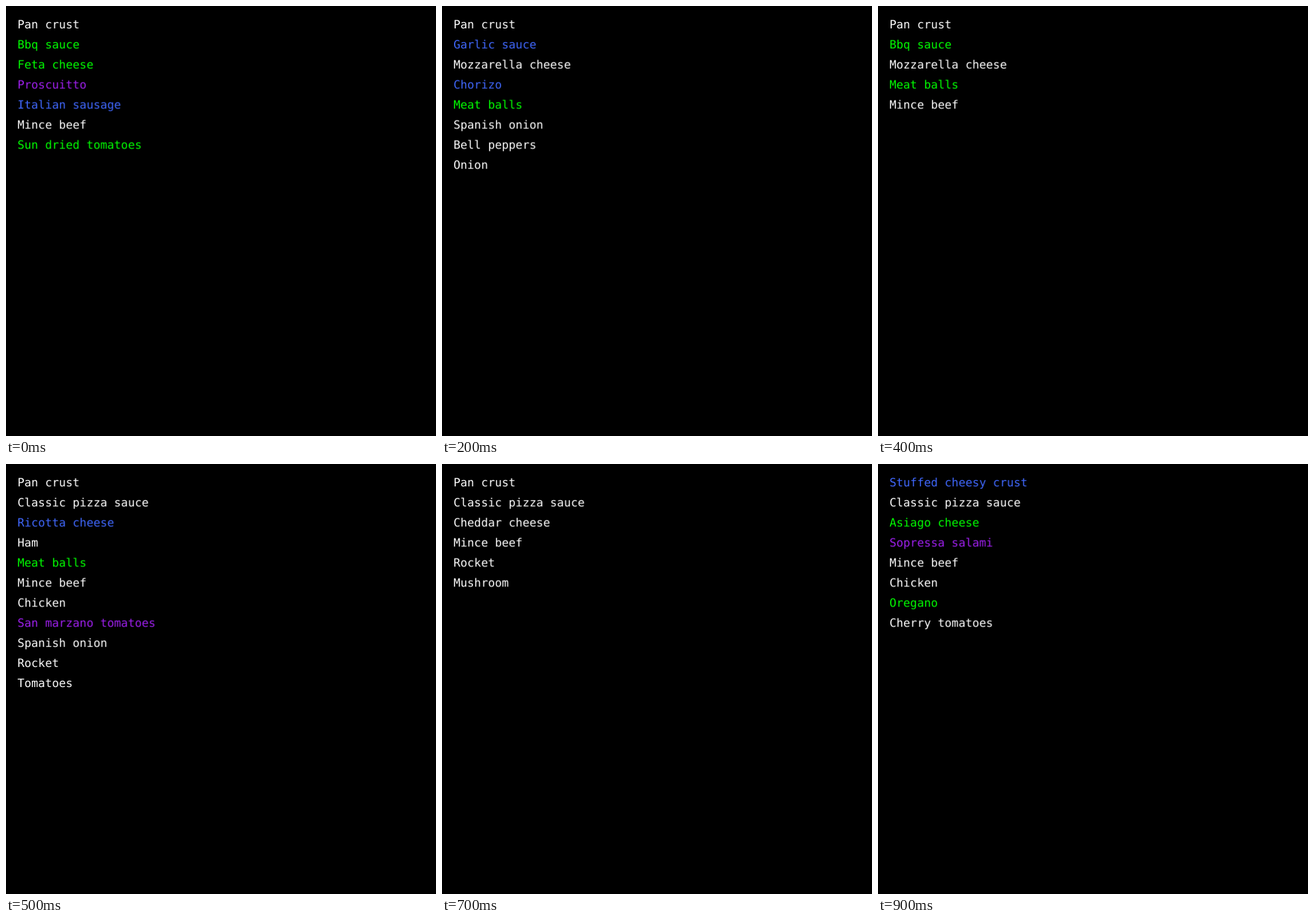
An HTML page with a canvas that plays this animation: 748x748 px, repeating every 1 s.

```html
<!DOCTYPE html>
<html lang="en">
<head>
<meta charset="utf-8">
<title>Random pizzas</title>
<style>
  html, body { margin: 0; height: 100%; overflow: hidden; background: #000; }
  canvas { display: block; width: 748px; height: 748px; }
</style>
</head>
<body>
<canvas id="stage" width="750" height="750"></canvas>
<script>
// The list is laid out on a 750 px square that CSS fits to the stage.
const SIZE = 750, STEP = 100;
const LEFT = 20, BASELINE = 39, LINE = 35;

// Items that are not listed here are common and white.
const rarity = {
  '#00ff00': 'Gluten free crust,Bbq sauce,Feta cheese,Asiago cheese,Meat balls,Sun dried tomatoes,Garlic,Oregano',
  '#4169ff': 'Stuffed cheesy crust,Garlic sauce,Ricotta cheese,Italian sausage,Chorizo,Basil',
  '#a020f0': 'Proscuitto,Sopressa salami,Anchovies,San marzano tomatoes'
};
const colors = {};
for (const [color, items] of Object.entries(rarity))
  for (const item of items.split(',')) colors[item] = color;

const pizzas = [
  'Pan crust,Bbq sauce,Feta cheese,Proscuitto,Italian sausage,Mince beef,Sun dried tomatoes',
  'Pan crust,Classic pizza sauce,Mozzarella cheese,Ham,Mince beef,Onion,Mushroom',
  'Pan crust,Garlic sauce,Mozzarella cheese,Chorizo,Meat balls,Spanish onion,Bell peppers,Onion',
  'Gluten free crust,Classic pizza sauce,Cheddar cheese,Italian sausage,Mince beef,Anchovies,Onion,Garlic,Basil,Spinach',
  'Pan crust,Bbq sauce,Mozzarella cheese,Meat balls,Mince beef',
  'Pan crust,Classic pizza sauce,Ricotta cheese,Ham,Meat balls,Mince beef,Chicken,San marzano tomatoes,Spanish onion,Rocket,Tomatoes',
  'Pan crust,Classic pizza sauce,Mozzarella cheese,Ham,Mince beef,Chicken,Onion,Spinach',
  'Pan crust,Classic pizza sauce,Cheddar cheese,Mince beef,Rocket,Mushroom',
  'Pan crust,Classic pizza sauce,Mozzarella cheese,Ham,Mince beef,Chicken,Spanish onion,Mushroom,Rocket,Tomatoes',
  'Stuffed cheesy crust,Classic pizza sauce,Asiago cheese,Sopressa salami,Mince beef,Chicken,Oregano,Cherry tomatoes'
].map(list => list.split(','));

const ctx = document.getElementById('stage').getContext('2d');
ctx.font = '20px "DejaVu Sans Mono", monospace';
ctx.textRendering = 'geometricPrecision';

function draw(pizza) {
  ctx.fillStyle = '#000';
  ctx.fillRect(0, 0, SIZE, SIZE);
  pizza.forEach((item, i) => {
    ctx.fillStyle = colors[item] || '#fff';
    ctx.fillText(item, LEFT, BASELINE + i * LINE);
  });
}

const start = performance.now();
function tick() {
  const time = performance.now() - start;
  draw(pizzas[Math.floor(time / STEP) % pizzas.length]);
  requestAnimationFrame(tick);
}
tick();
</script>
</body>
</html>
```
